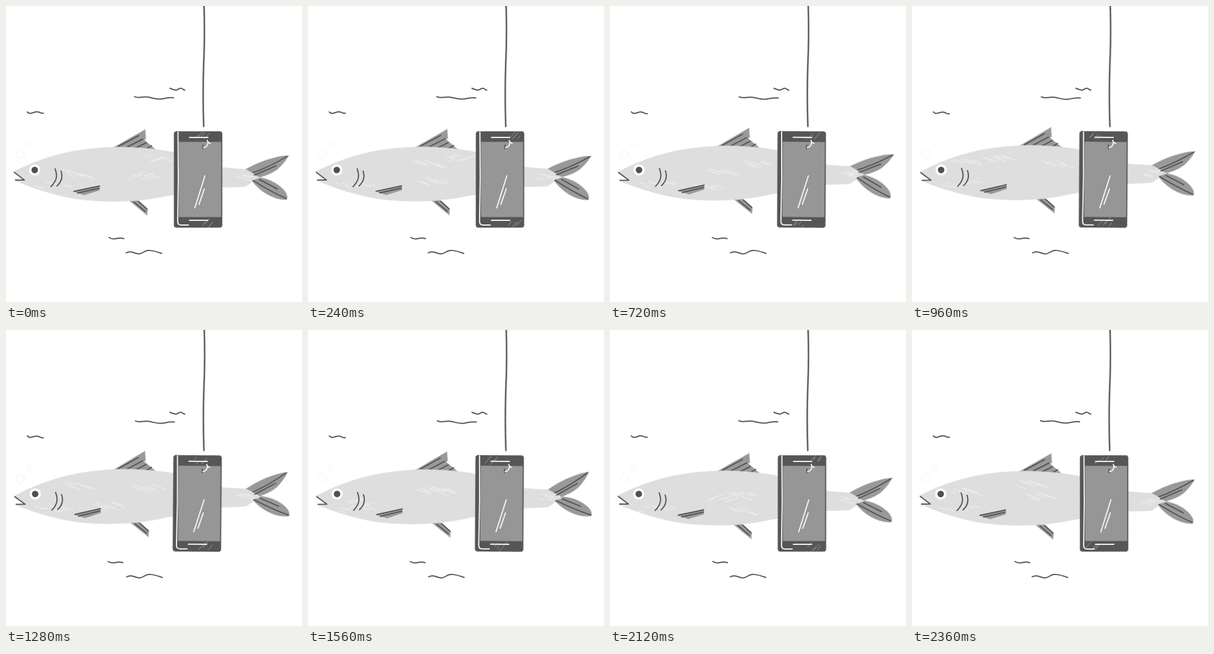
Write an HTML page that moves like this. It is 500 px wide and 500 px high and loops after 2400 ms.

```html
<!DOCTYPE html>
<html>
<head>
<meta charset="utf-8">
<style>
html, body { margin: 0; width: 100%; height: 100%; overflow: hidden; background: #fff; }
svg { display: block; width: 100vw; height: 100vh; fill: none; stroke-linecap: round; stroke-linejoin: round; }
.ink { stroke: #555; stroke-width: 2; }
.fin { fill: #999; stroke: #999; }
.skin { fill: #dedede; stroke: #dedede; }
.case { fill: #565656; stroke: #565656; }
.glass { fill: #969696; stroke: #969696; }
.rough { stroke-width: 1.6; stroke-dasharray: 1.5 1.5; stroke-linecap: butt; }
.shine { stroke: #f4f4f4; stroke-width: 2; }
.bubble { stroke: #e6e6e6; stroke-dasharray: 1 2.5; }
</style>
</head>
<body>
<svg viewBox="0 0 500 500">
  <defs>
    <path id="body" d="M13 280Q60 256 110 246Q170 235 230 240Q306 246 366 273Q390 275 405 276L419 284L414 285L429 290L416 294L415 298L404 305Q385 306 366 306Q290 318 270 321Q200 336 120 326Q70 318 16 295L31 294Z"/>
    <path id="string" d="M334.500 0Q336 50 334 95Q332 150 334 204"/>
    <clipPath id="bodyClip"><use href="#body"/></clipPath>
    <clipPath id="phoneClip"><path d="M285 212h80v18h-72v126h72v18h-80z"/></clipPath>
  </defs>

  <g class="ink">
    <path id="wave0" d="M36 179C40 183 43 181 46 180S52 178 55 179S60 182 63 181"/>
    <path id="wave1" d="M217 153C224 157 232 152 241 154S254 158 262 157S274 154 283 155"/>
    <path id="wave2" d="M277 139C281 141 283 141 286 142S291 139 295 139S299 142 302 142"/>
    <path id="wave3" d="M174 391C179 394 182 394 186 393S193 391 199 393"/>
    <path id="wave4" d="M203 417C208 414 212 415 217 417S226 420 232 416S244 411 263 418"/>
  </g>
  <circle class="bubble" cx="24" cy="251" r="7"/>
  <circle class="bubble" cx="39" cy="234" r="4"/>

  <g id="fish">
    <g id="tail">
      <path class="fin rough" d="M403 277Q430 262 452 257Q465 253 477 253Q471 264 458 276Q444 286 424 290L414 293Q426 309 440 317Q456 327 474 327Q477 321 470 312Q455 295 430 290Z"/>
      <path class="ink" d="M411 284Q445 272 475 254M419 286L456 270M416 294Q446 313 473 325M428 293L458 309"/>
    </g>
    <path class="fin rough" d="M182 239L235 209L236 224L233 226L254 244ZM209 329L222 328L239 343L238 353Z"/>
    <path class="ink" d="M190 237L224 219M205 238L231 225M219 240L237 231M234 243L246 236M216 331L235 347M224 330L238 343"/>
    <use href="#body" class="skin rough"/>
    <path id="scales" clip-path="url(#bodyClip)" stroke="#ebebeb" stroke-width="1.5"/>
    <path class="fin" d="M114 313L158 304L158 311L132 319Z"/>
    <path class="ink" d="M115 313L158 304M121 316L157 308"/>
    <path class="ink" d="M83 275C86 284 88 293 76 305M93 279C96 288 95 296 86 304"/>
    <path class="ink" d="M14 281L31 294M16 294L31 294"/>
    <circle cx="48.5" cy="277" r="9.5" fill="#fff"/>
    <circle cx="48.5" cy="277" r="5.5" fill="#505050"/>
  </g>

  <g id="phone">
    <rect class="case rough" x="284" y="212" width="81" height="162" rx="4"/>
    <rect class="glass" x="293" y="230" width="70" height="126"/>
    <path id="scuffs" clip-path="url(#phoneClip)" stroke="#828282" stroke-width="1.2"/>
    <path class="shine" d="M290.5 213L291 290L290 364Q290 370 296 370L308 370M310 222H341M310 362H341M336 287L319 341M335 309L326 335"/>
    <path class="ink" d="M333 235L332.500 241" stroke-width="3"/>
    <path class="shine" d="M340 227Q341 231 345 232M341 230Q341 238 334 239"/>
  </g>
  <g id="line" stroke="#555">
    <use href="#string" stroke-width="1.8"/>
    <use href="#string" stroke-width="3.2" stroke-dasharray="1.5 1.5" stroke-linecap="butt"/>
  </g>
</svg>
<script>
const LOOP = 2400, STEP = 40, HOLD = 120;
const el = id => document.getElementById(id);
const move = (id, value) => el(id).setAttribute('transform', value);

// [time, degrees] stops of the tail flick
const flick = [[0, 0], [600, 3.7], [1560, -5], [LOOP, 0]];

function eased(stops, t) {
  const i = stops.findIndex(s => s[0] > t);
  const [t0, a] = stops[i - 1], [t1, b] = stops[i];
  const k = (t - t0) / (t1 - t0);
  return a + (b - a) * k * k * (3 - 2 * k);
}

function seeded(seed) {
  return () => {
    seed = (seed * 16807) % 2147483647;
    return seed / 2147483647;
  };
}

function hatch(rnd, x, y, count, gap, length, slope) {
  let d = '';
  for (let i = 0; i < count; i++) {
    const dx = length * (0.4 + rnd() * 0.6);
    const x0 = x + i * gap + rnd() * 5, y0 = y + rnd() * 9;
    d += `M${x0} ${y0}l${dx} ${dx * slope}`;
  }
  return d;
}

function texture(n) {
  const rnd = seeded(7919 * (n + 3));
  for (let i = 0; i < 5; i++) rnd();
  let scales = '';
  for (let i = 0; i < 3; i++)
    scales += hatch(rnd, 60 + rnd() * 180, 252 + rnd() * 50, 7, 6, 22, rnd() < 0.7 ? 0.4 : -0.3);
  scales += hatch(rnd, 45, 296, 8, 8, 14, 0.3) + hatch(rnd, 385, 283, 5, 5, 20, 0.25);
  el('scales').setAttribute('d', scales);
  el('scuffs').setAttribute('d',
    hatch(rnd, 288 + rnd() * 50, 219, 4, 5, 9, -1.2) + hatch(rnd, 288 + rnd() * 50, 366, 4, 5, 9, -1.2));
}

let shown = -1;
function draw(now) {
  const t = Math.floor(now % LOOP / STEP) * STEP;
  const bob = (1 - Math.cos(2 * Math.PI * t / LOOP)) / 2;
  const drift = Math.sqrt(bob);

  move('fish', `translate(${bob}) rotate(${-1.2 * bob} 45 285)`);
  move('tail', `rotate(${eased(flick, t)} 410 288)`);
  move('phone', `translate(${-0.8 * bob}) rotate(${0.45 * bob} 335 205)`);
  move('line', `translate(${0.4 * drift})`);
  move('wave0', `rotate(${3 * bob} 40 180)`);
  move('wave1', `translate(${1.5 * drift} ${0.5 * drift})`);
  move('wave3', `translate(${-1.5 * drift})`);
  move('wave4', `translate(${bob})`);

  const n = Math.floor(t / HOLD);
  if (n !== shown) texture(shown = n);
}

function tick() {
  draw(performance.now());
  requestAnimationFrame(tick);
}
tick();
</script>
</body>
</html>
```
